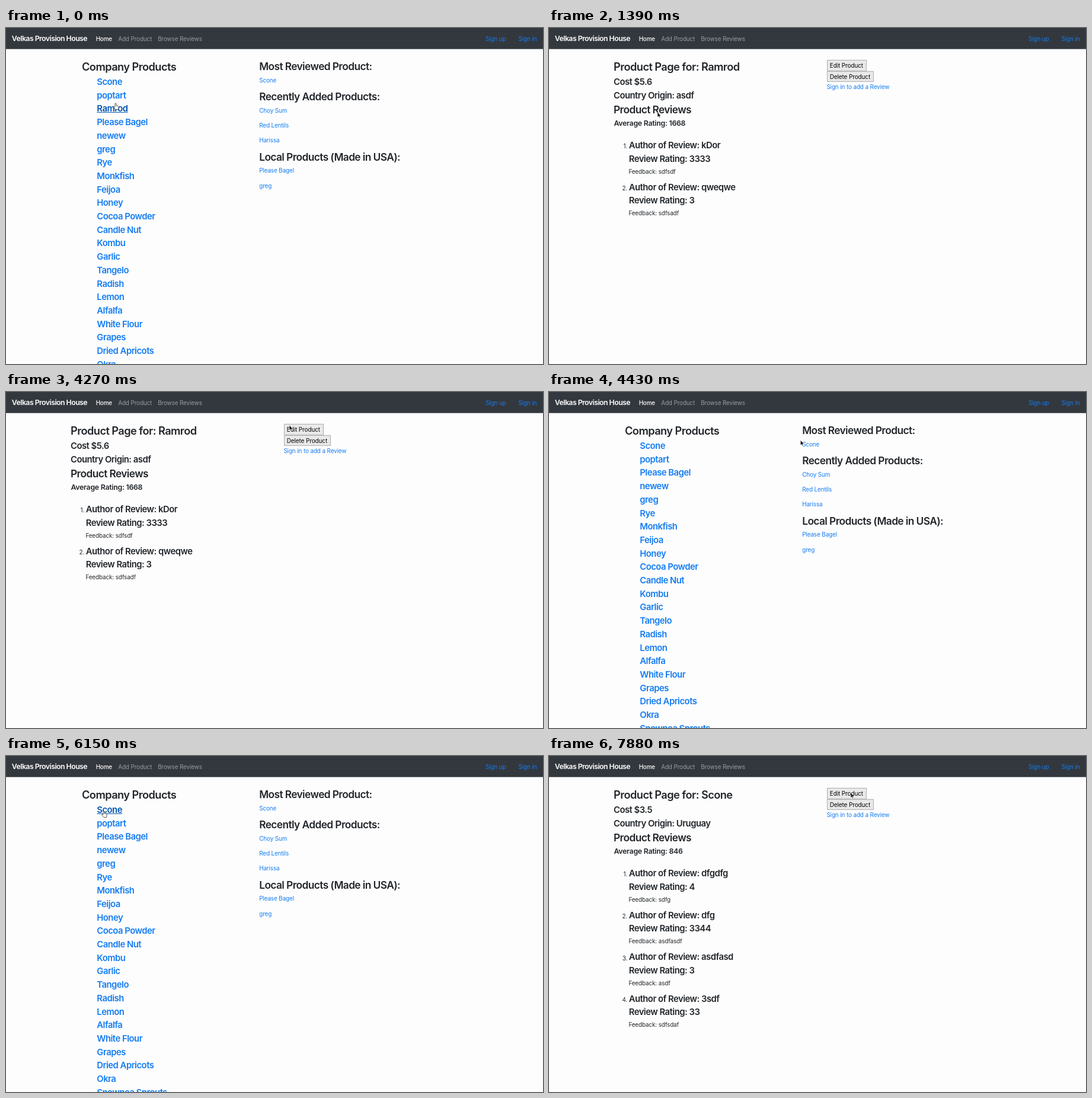
An HTML page for the animation above (8000 ms loop, 906x567 px).

```html
<!DOCTYPE html>
<html lang="en">
<head>
<meta charset="utf-8">
<title>Product catalogue</title>
<style>
  html, body { margin: 0; width: 100%; height: 100%; overflow: hidden; background: #fdfdfd; }
  body { position: relative; font: 400 9.87px/1.5 Inter, Roboto, sans-serif; color: #212529; }
  nav { position: absolute; inset: 0 0 auto; height: 35px; background: #33383e; border-bottom: 1px solid #8b8f92; }
  span, a { position: absolute; white-space: nowrap; transform: translateY(-50%); letter-spacing: -.01em; }
  a { color: #147cf3; }
  a.hover { color: #0056b3; text-decoration: underline; }
  .title, .h3, .h4, .h5, .brand { font-weight: 570; }
  .title { font-size: 18.2px; letter-spacing: -.03em; }
  .h3 { font-size: 17.3px; letter-spacing: -.033em; }
  .h4 { font-size: 14.8px; letter-spacing: -.033em; }
  .h5 { font-size: 12.3px; letter-spacing: -.021em; }
  .brand { font-size: 12.3px; letter-spacing: -.044em; color: #fff; }
  .on { color: #fff; font-weight: 500; letter-spacing: -.016em; }
  .off { color: #999c9f; }
  .num { transform: translate(-100%, -50%); }
  .btn { box-sizing: border-box; height: 18.4px; padding: 0 4.6px 0 4.2px; border: 1px solid #adadad;
    background: #e9e9e9; color: #000; line-height: 16.4px; letter-spacing: -.006em; }
  svg { position: absolute; inset: 0; width: 100%; height: 100%; pointer-events: none; }
</style>
</head>
<body>
<nav></nav>
<svg>
  <circle id="ring" r="20.3" fill="none" stroke="#e0586a" stroke-width="2.5" opacity=".88"/>
  <path id="arrow" d="M0 0V8.5L2 6.8L3.3 9.6L4.6 9L3.4 6.3H6Z" fill="#111" stroke="#fff" stroke-width=".6"/>
  <path id="hand" d="M-1 6V.8A1 1 0 0 1 1 .8V4L4.4 4.7Q5.4 5 5.2 6.5L4.6 10.5H0L-3.4 6.6Q-3 5-1 6Z"
    fill="#fff" stroke="#333" stroke-width=".8"/>
</svg>
<script>
const LOOP = 8000;
const $ = id => document.getElementById(id);
const ring = $('ring'), arrow = $('arrow'), hand = $('hand');

// y is the middle of the text line
function put(box, x, y, text, cls = '', tag = 'span') {
  const el = document.createElement(tag);
  el.className = cls;
  el.textContent = text;
  el.style.left = x + 'px';
  el.style.top = y + 'px';
  box.append(el);
}
const link = (box, x, y, text, cls) => put(box, x, y, text, cls, 'a');

function newPage() {
  const box = document.createElement('div');
  document.body.insertBefore(box, document.querySelector('svg'));
  return box;
}

function homePage(products) {
  const box = newPage();
  put(box, 128, 66, 'Company Products', 'title');
  products.forEach((p, i) => link(box, 153.3, 91 + i * 22.7, p, 'h4'));
  const x = 427.2;
  put(box, x, 65, 'Most Reviewed Product:', 'h3');
  link(box, x, 88, 'Scone');
  put(box, x, 116.3, 'Recently Added Products:', 'h3');
  ['Choy Sum', 'Red Lentils', 'Harissa'].forEach((p, i) => link(box, x, 139 + i * 25.2, p));
  put(box, x, 217.5, 'Local Products (Made in USA):', 'h3');
  ['Please Bagel', 'greg'].forEach((p, i) => link(box, x, 240.3 + i * 25.2, p));
  return box;
}

function productPage(name, cost, country, average, reviews) {
  const box = newPage(), x = 109;
  put(box, x, 66, 'Product Page for: ' + name, 'title');
  put(box, x, 91, 'Cost $' + cost, 'h4');
  put(box, x, 114, 'Country Origin: ' + country, 'h4');
  put(box, x, 138.3, 'Product Reviews', 'h3');
  put(box, x + .5, 160.7, 'Average Rating: ' + average, 'h5');
  reviews.forEach(([author, rating, feedback], i) => {
    const y = 198 + i * 70.6;
    put(box, 132.2, y + 1.3, i + 1 + '.', 'num');
    put(box, 134.7, y, 'Author of Review: ' + author, 'h4');
    put(box, 134.7, y + 22.6, 'Review Rating: ' + rating, 'h4');
    put(box, 134.4, y + 43.6, 'Feedback: ' + feedback);
  });
  put(box, 468.6, 63.2, 'Edit Product', 'btn');
  put(box, 468.6, 81.5, 'Delete Product', 'btn');
  link(box, 468.4, 98.5, 'Sign in to add a Review');
  return box;
}

const nav = document.querySelector('nav');
put(nav, 9.8, 17.8, 'Velkas Provision House', 'brand');
put(nav, 151.7, 18, 'Home', 'on');
put(nav, 189.2, 18, 'Add Product', 'off');
put(nav, 256.2, 18, 'Browse Reviews', 'off');
link(nav, 809, 18, 'Sign up');
link(nav, 864.6, 18, 'Sign in');

const products = ['Scone', 'poptart', 'Ramrod', 'Please Bagel', 'newew', 'greg', 'Rye', 'Monkfish',
  'Feijoa', 'Honey', 'Cocoa Powder', 'Candle Nut', 'Kombu', 'Garlic', 'Tangelo', 'Radish', 'Lemon',
  'Alfalfa', 'White Flour', 'Grapes', 'Dried Apricots', 'Okra', 'Snowpea Sprouts'];

// start time, page, time until which the hand pointer lingers
const pages = [
  [0, homePage(products), 0],
  [1240, productPage('Ramrod', '5.6', 'asdf', 1668,
    [['kDor', 3333, 'sdfsdf'], ['qweqwe', 3, 'sdfsadf']]), 1390],
  [4430, homePage(products.filter(p => p !== 'Ramrod')), 0],
  [6480, productPage('Scone', '3.5', 'Uruguay', 846, [['dfgdfg', 4, 'sdfg'],
    ['dfg', 3344, 'asdfasdf'], ['asdfasd', 3, 'asdf'], ['3sdf', 33, 'sdfsdaf']]), 6700]
];

// pointer path: time, x, y
const path = [[0, 185, 127], [520, 189, 106], [930, 182, 138], [1070, 182, 139.5], [1390, 183, 142],
  [1700, 215, 160], [2190, 497, 99], [2340, 508, 78], [2640, 506, 75], [2790, 498, 77], [4000, 498, 77],
  [4110, 490, 66], [4256, 478, 56], [4984, 209, 183], [5130, 200, 166], [6125, 165, 93], [6290, 163, 91],
  [6480, 170, 91], [6662, 453, 88], [7390, 510, 99], [7530, 510, 92], [7880, 509, 62], [LOOP, 509, 62]];

const clicks = [[1070, 1240], [2790, 2920], [6290, 6480]];

const bursts = [[100, 1070, 8], [1240, 1390, 2], [1740, 2640, 7], [2790, 2920, 2],
  [4110, 5130, 8], [5300, 6290, 7], [6480, 7390, 6], [7530, 7880, 3]];

function snap(t) {
  let last = 0;
  for (const [a, b, n] of bursts) {
    if (t < a) break;
    const gap = (b - a) / (n - 1);
    last = a + gap * Math.min(n - 1, Math.floor((t - a) / gap));
  }
  return last;
}

function pointerAt(t) {
  const i = path.findIndex(p => p[0] > t);
  const [t0, x0, y0] = path[i - 1], [t1, x1, y1] = path[i];
  const k = (t - t0) / (t1 - t0);
  return [x0 + (x1 - x0) * k, y0 + (y1 - y0) * k];
}

const show = (el, on) => el.style.display = on ? '' : 'none';

let hovered = null;
function draw() {
  const now = performance.now() % LOOP, t = snap(now);
  const current = pages.filter(p => p[0] <= now).pop();
  pages.forEach(p => show(p[1], p === current));

  const [x, y] = pointerAt(t);
  const under = document.elementFromPoint(x, y);
  hovered?.classList.remove('hover');
  hovered = under && under.closest('a');
  hovered?.classList.add('hover');

  const isHand = !!hovered || t < current[2];
  show(hand, isHand);
  show(arrow, !isHand);
  show(ring, clicks.some(([a, b]) => t >= a && t < b));
  for (const el of [hand, arrow, ring]) el.setAttribute('transform', `translate(${x} ${y})`);
  requestAnimationFrame(draw);
}
draw();
</script>
</body>
</html>
```
